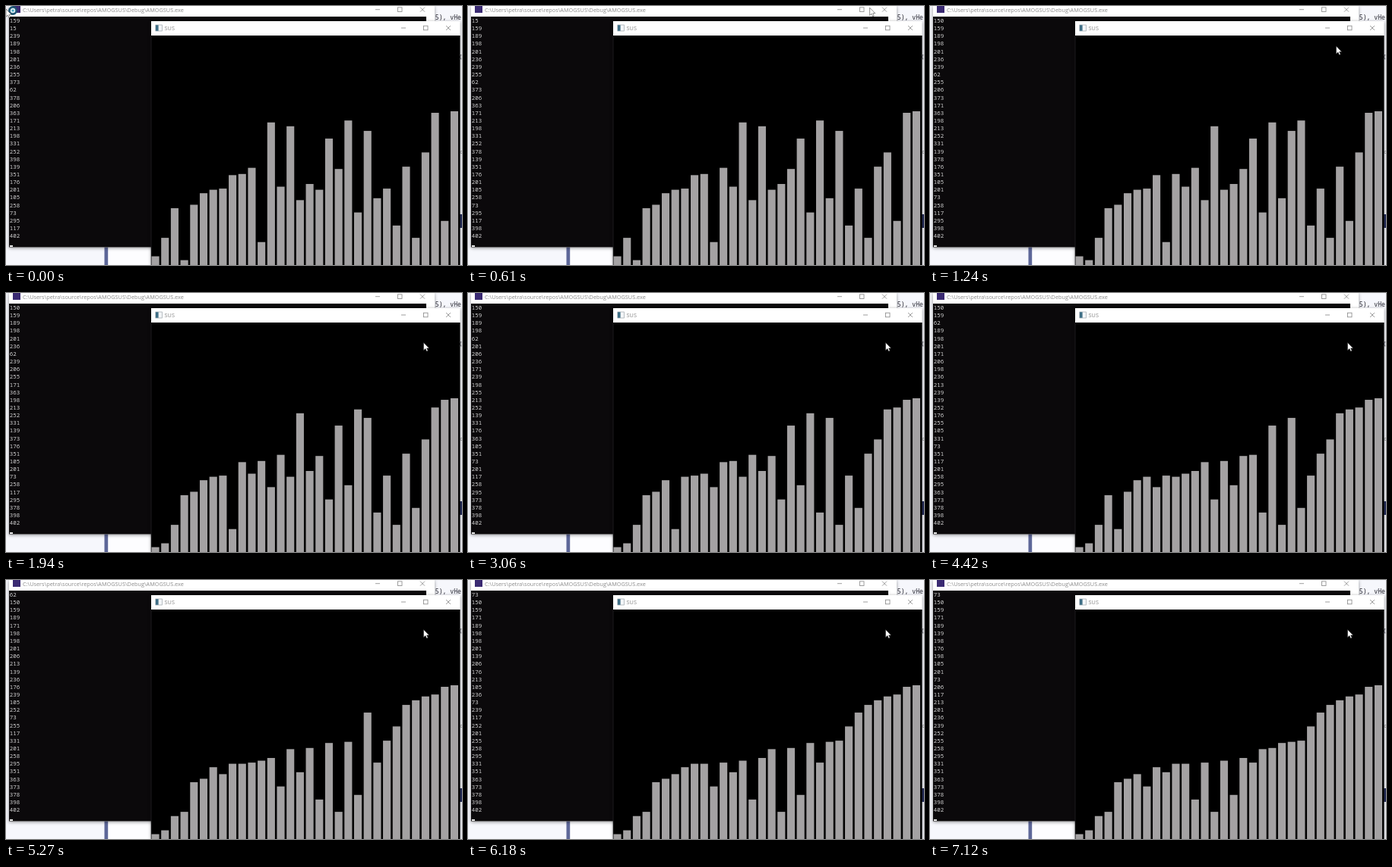
These frames come from a looping animation (600 px wide and 342 px high, 7150 ms). An HTML page:

```html
<!DOCTYPE html>
<html lang="en">
<head>
<meta charset="utf-8">
<title>Sorting bars</title>
<style>
  html, body { margin: 0; width: 100%; height: 100%; overflow: hidden; background: #f6f7fc; }
  svg { display: block; width: 600px; height: 342px; }
  .title { font: 7.3px "Open Sans", "Noto Sans", sans-serif; fill: #8b8b8b; }
  .mono { font: 7.5px "Noto Sans Mono", "DejaVu Sans Mono", monospace; }
  .window { filter: drop-shadow(0 1px 2px rgba(0, 0, 0, .4)); }
  #rows { fill: #d2d2d2; }
  #bars { fill: #a4a2a3; }
  .btn { fill: none; stroke: #858585; stroke-width: .8; }
</style>
</head>
<body>
<svg viewBox="0 0 600 342" xmlns="http://www.w3.org/2000/svg">
  <defs>
    <g id="buttons" class="btn">
      <path d="M-3 0H3"/>
      <rect x="26.4" y="-2.8" width="5.6" height="5.6"/>
      <path d="M56 -3l6 6M62 -3l-6 6"/>
    </g>
  </defs>

  <!-- editor behind the windows -->
  <rect width="600" height="342" fill="#f6f7fc"/>
  <rect x="134" y="318" width="60" height="24" fill="#fdfdff"/>
  <rect x="129.5" y="318" width="4.7" height="24" fill="#5d6798"/>
  <g class="mono" fill="#22222c">
    <text x="560" y="18.4" style="font-size:8.1px">,5), vHe</text>
    <text x="596" y="69">(</text>
    <text x="597" y="195" fill="#888">c</text>
  </g>
  <rect x="597" y="275" width="3" height="18" fill="#27305e"/>

  <!-- console window -->
  <g class="window">
    <rect x="4" width="560" height="318.5" fill="#fff"/>
    <rect x="4" y="14" width="549" height="304.5" fill="#0b090b"/>
  </g>
  <rect x="5" y="316" width="4" height="2" fill="#e8e8e8"/>
  <rect x="9" y="0" width="10" height="9" fill="#3a2a72"/>
  <text class="title" x="22" y="7.7">C:\Users\petra\source\repos\AMOGSUS\Debug\AMOGSUS.exe</text>
  <use href="#buttons" x="489" y="4.7"/>
  <g id="rows" class="mono"></g>

  <!-- bar window -->
  <g class="window">
    <rect x="191" y="20" width="406.5" height="19" fill="#fff"/>
    <rect x="191" y="39" width="406.5" height="303" fill="#000"/>
  </g>
  <path d="M191 39V342" stroke="#2e2e30" stroke-width=".6"/>
  <rect x="196.8" y="25" width="8.6" height="8" fill="#f4f6f8" stroke="#8a949c" stroke-width=".6"/>
  <rect x="197" y="25.2" width="3.6" height="7.6" fill="#3f6f86"/>
  <text class="title" x="208.6" y="31.7">SUS</text>
  <use href="#buttons" x="523" y="29"/>
  <g id="bars"></g>

  <g id="pointer">
    <g id="busy">
      <circle cx="9" cy="2" r="4.6" fill="#dceef4" stroke="#1d5573" stroke-width="2.6"/>
      <circle cx="9" cy="2" r="1.6" fill="#47a5bf"/>
    </g>
    <path d="M0 0V10.2L2.4 8L4 11.6L5.7 10.8L4.1 7.4H7.2Z" fill="#fff" stroke="#222" stroke-width=".5"/>
  </g>
</svg>
<script>
const LOOP = 7150, FIRST = 21, HIDDEN = 3;
const start = [25, 73, 150, 159, 15, 239, 189, 198, 201, 236, 255, 373, 62, 378, 206, 363,
  171, 213, 198, 331, 252, 398, 139, 351, 176, 201, 105, 258, 73, 295, 117, 402];

// [ms, steps done]: near constant, a little quicker towards the end
const pace = [[0, 0.31], [5270, 109.7], [LOOP, 149.8]];

// [ms, x, y]
const path = [[0, 0, 4], [770, 595, 2], [1240, 534.5, 53], [1520, 549.5, 65.5]];

// Passes alternate: neighbours one by one, then separate pairs. The log prints after each pass.
function sortSteps(values, passes) {
  const a = [...values];
  const steps = [];
  let log = [...a];
  const record = () => steps.push({ values: [...a], log });
  record();
  for (let p = 0; p < passes; p++) {
    const [from, stride] = p % 2 ? [0, 2] : [1, 1];
    for (let j = from; j < a.length - 1; j += stride) {
      if (a[j] <= a[j + 1]) continue;
      [a[j], a[j + 1]] = [a[j + 1], a[j]];
      record();
    }
    log = [...a];
    record();
  }
  return steps;
}

const linear = u => u;
const smooth = u => u * u * (3 - 2 * u);

function along(keys, t, ease) {
  const next = keys.findIndex(key => key[0] > t);
  if (next < 0) return keys[keys.length - 1].slice(1);
  const [t0, ...a] = keys[next - 1], [t1, ...b] = keys[next];
  const u = ease((t - t0) / (t1 - t0));
  return a.map((v, n) => v + (b[n] - v) * u);
}

function add(parent, tag, attrs) {
  const el = document.createElementNS("http://www.w3.org/2000/svg", tag);
  for (const k in attrs) el.setAttribute(k, attrs[k]);
  return document.getElementById(parent).appendChild(el);
}

const bars = start.map((_, i) => add("bars", "rect", { x: 191.5 + i * 12.69, width: 10.1 }));
const rows = start.slice(HIDDEN).map((_, i) => add("rows", "text", { x: 4.7, y: 22 + i * 10.15 }));
const pointer = document.getElementById("pointer");
const busy = document.getElementById("busy");
const steps = sortSteps(start, 16);
let shown = -1;

function showStep(n) {
  if (n === shown) return;
  shown = n;
  const { values, log } = steps[FIRST + n];
  bars.forEach((bar, i) => {
    const top = 139 + (402 - values[i]) * 0.508;
    bar.setAttribute("y", top);
    bar.setAttribute("height", 342 - top);
  });
  rows.forEach((row, i) => { row.textContent = log[i + HIDDEN]; });
}

function draw(now) {
  const t = now % LOOP;
  showStep(Math.floor(along(pace, t, linear)[0]));
  pointer.setAttribute("transform", `translate(${along(path, t, smooth)})`);
  busy.setAttribute("visibility", t < 400 ? "visible" : "hidden");
}

let origin = null;
function tick(now) {
  origin ??= now;
  draw(now - origin);
  requestAnimationFrame(tick);
}
draw(0);
requestAnimationFrame(tick);
</script>
</body>
</html>
```
